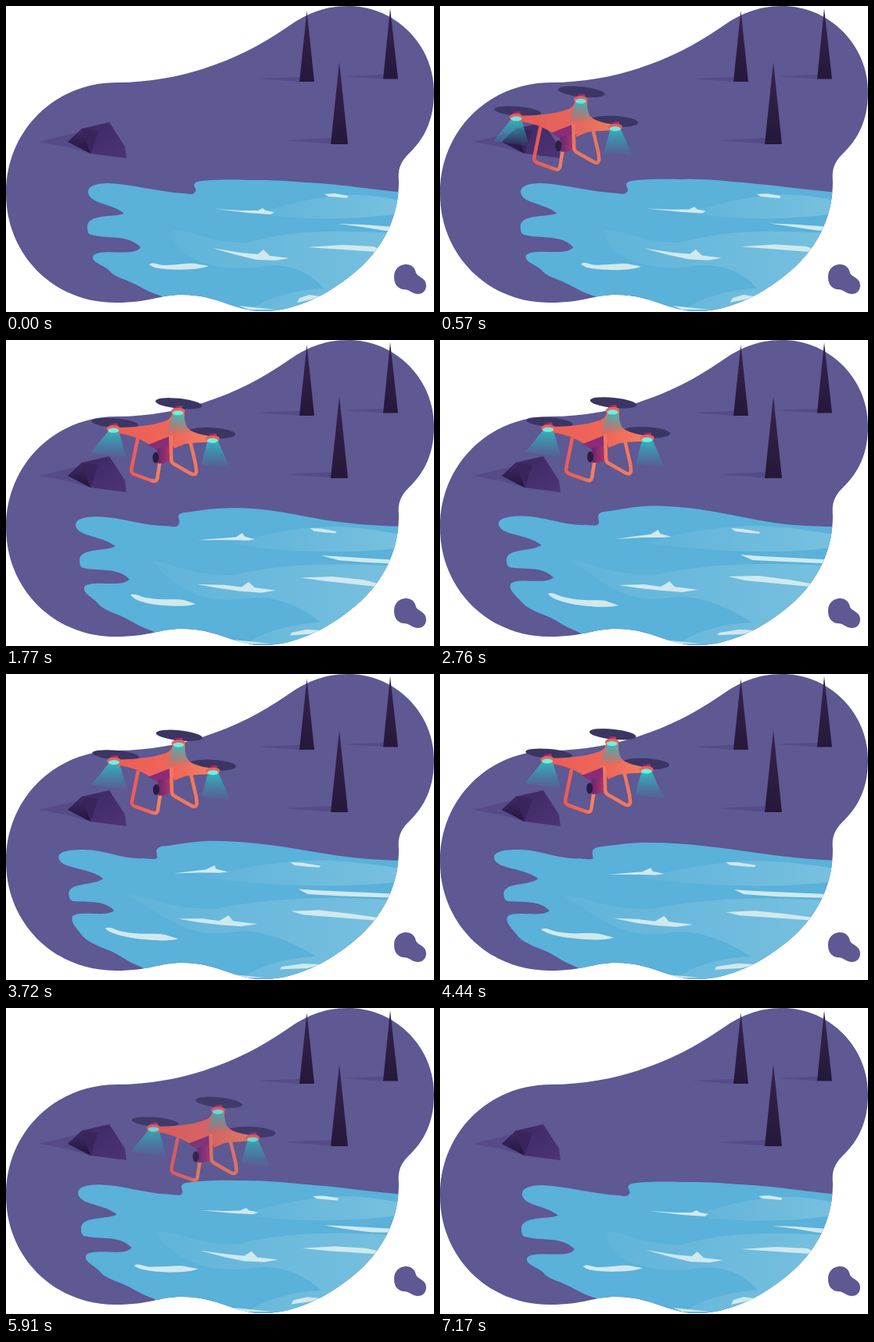
An HTML page that plays this animation: 547 px wide and 392 px high, repeating every 7.2 s.

```html
<!DOCTYPE html>
<html lang="en">
<head>
<meta charset="utf-8">
<title>Drone over the lake</title>
<style>
html, body { margin: 0; width: 100%; height: 100%; overflow: hidden; background: #fff; }
svg { display: block; width: 547px; height: 392px; }
</style>
</head>
<body>
<svg viewBox="0 0 547 392">
  <defs>
    <path id="land" d="M0 240C0 160 62 98 142 98C228 97 300 68 358 28C382 11 405 0 437 0C498 0 547 50 547 110C547 146 535 170 514 190C502 202 501 212 502 225C502 275 478 318 436 349C400 377 360 391 330 391C290 391 272 370 225 370C195 370 185 380 140 380C60 380 0 318 0 240Z"/>
    <clipPath id="shore"><use href="#land"/></clipPath>
    <linearGradient id="tree" x2="0" y2="1"><stop stop-color="#38234f"/><stop offset="1" stop-color="#251839"/></linearGradient>
    <linearGradient id="rock" x2="1" y2="1"><stop stop-color="#3b2760"/><stop offset="1" stop-color="#4d3475"/></linearGradient>
    <linearGradient id="cleft" x2="0" y2="1"><stop stop-color="#412b66"/><stop offset="1" stop-color="#22153c"/></linearGradient>
    <linearGradient id="shine"><stop stop-color="#60b4da"/><stop offset="1" stop-color="#78c0df"/></linearGradient>
    <linearGradient id="hull"><stop stop-color="#ec5c57"/><stop offset=".6" stop-color="#ee6759"/><stop offset="1" stop-color="#f58562"/></linearGradient>
    <linearGradient id="beam" x2="0" y2="1"><stop stop-color="#2cc3c3" stop-opacity=".85"/><stop offset="1" stop-color="#2c9fb0" stop-opacity=".08"/></linearGradient>
    <linearGradient id="pod"><stop stop-color="#67246f"/><stop offset="1" stop-color="#b8386f"/></linearGradient>
    <g id="motor">
      <path d="M-5 -9H5L6 -2H-6Z" fill="url(#pod)"/>
      <ellipse cy="-2" rx="9" ry="4.5" fill="#ee5f58"/>
      <ellipse rx="7" ry="3" fill="#6df0e2"/>
    </g>
  </defs>

  <use href="#land" fill="#5e5893"/>
  <path d="M496 347C496 336 504 331 511 331C520 331 523 337 524 342C527 348 537 348 537 358C537 366 531 369 526 369C518 368 516 363 508 363C500 362 496 356 496 347Z" fill="#5e5893"/>

  <path d="M322 93L376 91V97ZM430 90L483 88V93.500ZM356 172L416 169V176.500ZM42 174L92 162L108 189L80 181Z" fill="#544b88"/>
  <g fill="url(#tree)">
    <path d="M384.500 6L394 97H375Z"/>
    <path d="M491 3L501 93.500H482Z"/>
    <path d="M426 72L437 177H415Z"/>
  </g>
  <path d="M79 174L97 157L132 149L152 180L154 195L108 189Z" fill="url(#rock)"/>
  <path d="M79 174L97 157L108 189Z" fill="url(#cleft)"/>
  <path d="M97 157L118 160L108 189Z" fill="#3a255b"/>

  <g id="water" clip-path="url(#shore)"></g>

  <g id="drone">
    <g fill="#3b3563">
      <ellipse cx="139" cy="105" rx="30" ry="6" transform="rotate(5 139 105)"/>
      <ellipse cx="220.500" cy="80" rx="30" ry="6.500" transform="rotate(6 220 80)"/>
      <ellipse cx="262.500" cy="118" rx="30.500" ry="7" transform="rotate(3 262 118)"/>
    </g>
    <path d="M130 116H144L154 150L108 143Z" fill="url(#beam)"/>
    <path d="M257 129H271L286 163L249 158Z" fill="url(#beam)"/>
    <path d="M168 125L160 164Q159 169 164 171L186 179Q192 181 193 176L197 150" fill="none" stroke="url(#hull)" stroke-width="4.500" stroke-linejoin="round"/>
    <path d="M129 111C150 111 178 110 195 105C207 102 211 99 212 92H228C227 103 229 111 236 115C246 120 258 122 272 123L271 129C252 130 240 130 228 132L204 142L182 132C165 122 150 118 130 117Z" fill="url(#hull)"/>
    <path d="M181 133L209 122L214 138L200 144Z" fill="#8a2c77"/>
    <path d="M193 138L211 134L212 151Q208 157 194 157Z" fill="url(#pod)"/>
    <ellipse cx="191" cy="149.500" rx="4" ry="7" fill="#2a1c40"/>
    <path d="M210 121L211 152Q211 156 215 158L236 170Q242 173 243 167L242 158L235 128" fill="none" stroke="#f0785f" stroke-width="4.500" stroke-linejoin="round"/>
    <path d="M213 94H226L233 117L204 119Z" fill="url(#beam)"/>
    <use href="#motor" x="137" y="114.500"/>
    <use href="#motor" x="219.500" y="92"/>
    <use href="#motor" x="263.500" y="127.500"/>
  </g>
</svg>
<script>
const LOOP = 7.2;
const water = document.getElementById('water');
const drone = document.getElementById('drone');

const crest = [
  'M510 239C460 234 430 229 400 227C365 225 350 222.5 310 223C275 222 255 223 245 225C234 229 247 235 241 239',
  'M510 239C470 239 445 237 410 231C360 222 315 212.5 262 212.5C240 212.5 215 219 200 220C188 222 193 230 193 235'
];
const lobes = [
  'C239 242 236 241 227 240C195 238 160 228 130 227C114 227 105 231 105 238C106 254 135 252 151 266C136 271 104 266 104 283C104 290 106 293 109 293C130 299 156 292 172 309C164 322 125 310 112 319C106 328 126 332 132 339C138 347 150 349 162 355C175 361 185 368 200 372L230 392L510 392Z',
  'C191 238 185 237 175 236C150 238 125 225 100 225C80 225 67 227 67 235C68 250 105 247 124 262C112 272 80 266 80 282C80 288 83 291 87 291C105 293 125 289 138 303C128 312 95 302 85 310C81 318 92 328 98 336C106 345 122 350 136 356C146 361 155 368 167 373L210 392L510 392Z'
];
const light = [
  ['M315 264C345 262 380 244 440 242C470 241 490 247 510 250L510 265C450 274 370 276 315 264Z',
   'M250 260C300 246 350 238 400 238C450 240 490 247 510 250L510 265C440 275 340 272 250 260Z'],
  ['M211 289C225 280 260 306 310 303C360 288 420 286 510 292L510 392L310 392C330 372 380 362 406 362C385 335 350 328 318 335C270 340 215 325 211 289Z',
   'M152 280C185 286 215 303 270 300C330 288 400 283 510 290L510 392L300 392C320 372 370 362 397 362C360 340 320 325 290 330C230 338 215 316 152 280Z']
];
const foam = [
  ['M407 241L420 240L437 243L436 246L424 245L412 244Z',
   'M363 241L378 242L402 246L400 248L384 247L368 245Z'],
  ['M267 260L300 262L322 262L328 259L332 262L343 264L338 267L310 265Z',
   'M213 255L240 251L255 249L266 243L268 248L283 252L272 253L245 253Z'],
  ['M424 279L455 280L510 284L510 288L485 288L455 283Z',
   'M373 275L400 277L510 282L510 287L430 284L385 282Z'],
  ['M385 309L430 306L470 308L476 311L474 315L430 312Z',
   'M364 303L400 302L440 307L480 313L485 317L380 308Z'],
  ['M263 310L300 316L322 318L329 312L337 320L362 323L345 326L320 325L295 319Z',
   'M219 314L250 313L272 316L284 309L290 316L321 320L300 323L275 321L245 318Z'],
  ['M183 331C190 327 194 333 205 332C225 331 238 328 247 331L259 333C245 339 215 338 203 337C190 336 186 334 183 331Z',
   'M126 325C134 322 138 328 150 330C170 335 190 332 202 334L220 340C205 344 180 341 165 339C148 336 132 332 126 325Z'],
  ['M375 374L388 370L402 372L390 376L372 380Z',
   'M352 375L380 371L404 372L385 377L350 378Z'],
  ['M298 384L326 387L345 389L310 389Z',
   'M280 384L310 387L330 389L295 389Z']
];

const clamp = v => Math.min(1, Math.max(0, v));

// Rises smoothly to 1 at the peak, then falls back to 0 at the loop's end.
const swell = (s, peak) =>
  (1 - Math.cos(Math.PI * (s < peak ? s / peak : (LOOP - s) / (LOOP - peak)))) / 2;

// Blends two paths of equal structure, x by px and y by py.
function morph([from, to], px, py) {
  const ends = to.match(/[\d.]+/g);
  let i = 0;
  return from.replace(/[\d.]+/g, v => {
    const k = i % 2 ? py : px;
    return (+v + (ends[i++] - v) * k).toFixed(2);
  });
}

function addPath(fill) {
  const path = document.createElementNS('http://www.w3.org/2000/svg', 'path');
  path.setAttribute('fill', fill);
  return water.appendChild(path);
}

const lake = addPath('#5ab1d9');
const layers = [
  ...light.map(pair => [addPath('url(#shine)'), pair]),
  ...foam.map(pair => [addPath('#d0e9ee'), pair])
];

function draw(s) {
  const drift = swell(s, 3.95);
  const lift = swell(s, 2.7);
  lake.setAttribute('d', morph(crest, drift, lift) + morph(lobes, drift, drift));
  for (const [path, pair] of layers) path.setAttribute('d', morph(pair, drift, lift));

  const arrive = Math.max(0, 0.953 - s);
  const leave = Math.max(0, s - 5.18);
  const hover = clamp((s - 0.953) / 4.227);
  const x = -266 * arrive ** 2 + 98 * leave ** 2 + 2 * Math.sin(Math.PI * hover) - 0.8;
  const y = 194 * arrive ** 2 + 86 * leave ** 2 - 6.5 * hover ** 2 + 1.5;
  drone.setAttribute('transform', `translate(${x} ${y})`);
  drone.setAttribute('opacity', Math.min(clamp((s - 0.05) / 0.55), clamp(6.75 - s)));
}

const start = performance.now();
function tick() {
  draw((performance.now() - start) / 1000 % LOOP);
  requestAnimationFrame(tick);
}
tick();
</script>
</body>
</html>
```
